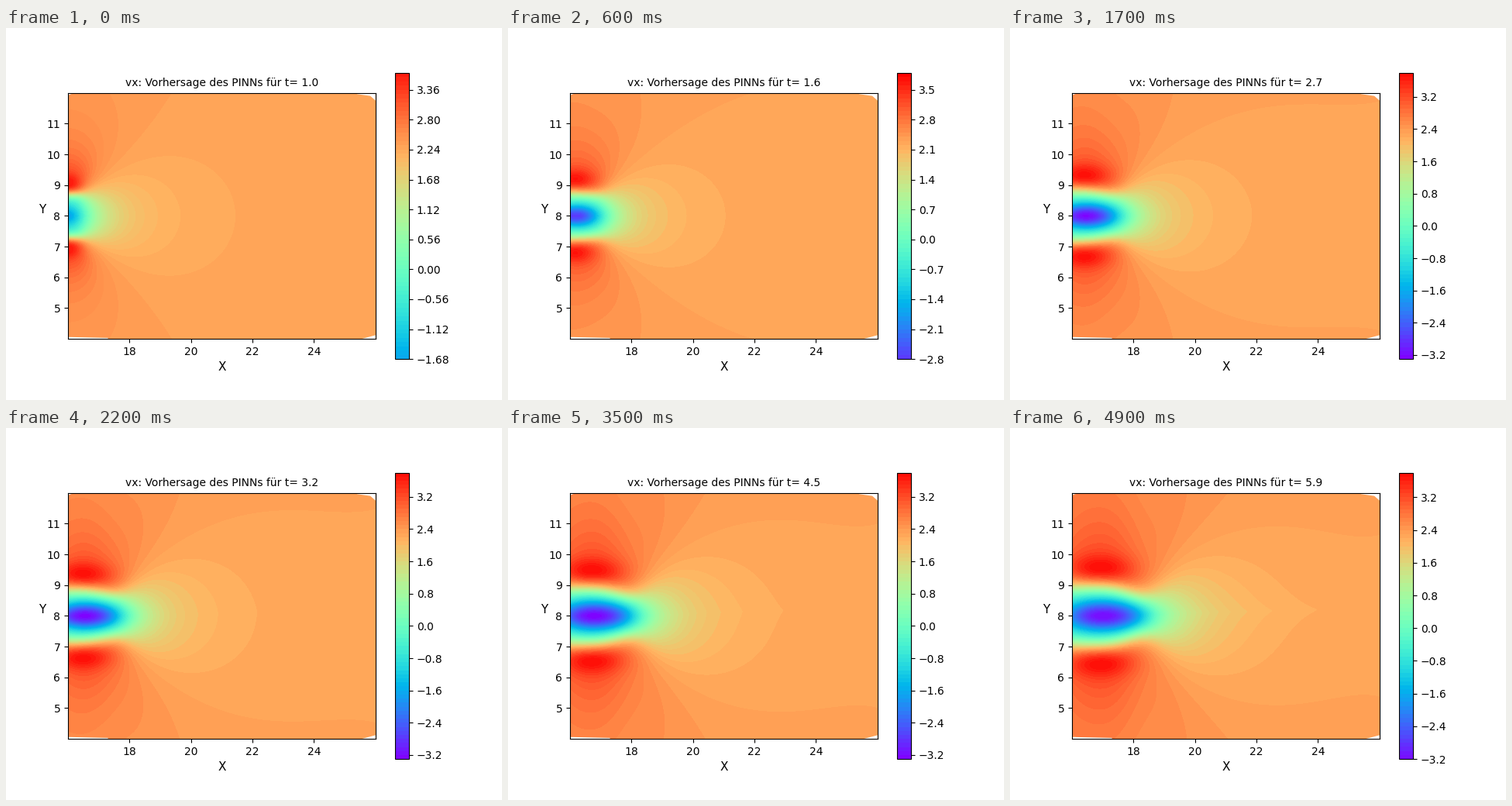
Write a matplotlib script that moves like this. It is 640 px wide and 480 px high and loops after 5 s.

```python
import numpy as np
import matplotlib.pyplot as plt
from matplotlib.animation import FuncAnimation

plt.rcParams["font.family"] = "DejaVu Sans"

FRAMES, INTERVAL = 50, 100
X, Y = np.meshgrid(np.linspace(16, 26, 221), np.linspace(4, 12, 177))
S, D = X - 16, np.abs(Y - 8)

# Corners outside the sampled region
CORNERS = [
    [(25.35, 12), (25.4, 11.96), (25.83, 11.9), (26, 11.75), (26, 12)],
    [(25.55, 4), (26, 4.12), (26, 4)],
    [(16, 4), (16, 4.06), (17.3, 4.03), (17.3, 4)],
    [(16, 12), (16.2, 12), (16, 11.92)],
]


def bell(x, width):
    return np.exp(-(x / width)**2)


def rise(age, scale):
    return 1 - np.exp(-age / scale)


def sheet(offset, start, end, soft):
    """Streamwise velocity of a softened vortex sheet."""
    a = np.sqrt(offset**2 + soft**2)
    return offset / a * (np.arctan((S - start) / a) - np.arctan((S - end) / a))


def velocity(age):
    """Free stream with a growing vortex pair, a reversed jet and side lobes."""
    growth = age**0.58
    onset = rise(age, 0.35)

    # Two sheets that converge towards their downstream end
    center, length = 0.43 * growth, 1 + 0.82 * growth
    start, end = center - length / 2, center + length / 2
    half = 0.72 + 0.08 * growth
    soft = 0.30 + 0.08 * growth
    dipole = 2.05 + 1.09 * age - 0.045 * age**2
    strength = dipole / (2 * half * length)
    gap = half * (1 - 0.14 * growth * bell(S - end + 0.15, 0.9))
    pair = strength * (sheet(D - gap, start, end, soft)
                       - sheet(D + gap, start, end, soft))

    ds = S - 0.19 * age
    reach = 0.5 + rise(age, 1.2)
    width = 0.30 + 0.06 * growth
    jet = (1 + 1.6 * onset - 0.17 * age) * bell(ds, reach) * bell(D, width)
    lobe = ((0.45 + 0.25 * onset) * bell(ds, 0.7 * reach)
            * bell(D - 1 - 0.2 * growth, width))

    tail = (0.5 * (age / 4.9)**4 * (1 - bell(S, 3))
            * np.exp(-S / 3.6 - np.abs(Y - 8 - 0.025 * S) / 0.45))
    stream = 2.308 + 0.018 * age - 0.007 * age * (S / 10)**4
    return stream + pair - jet + lobe - tail


def value_range(age):
    low = -1.65 - 1.76 * rise(age, 0.63) + 0.045 * age
    high = 3.74 + (0.9 * age - 0.1) * np.exp(-age / 0.4)
    return low, high


def contour_levels(low, high):
    step = 0.08 if high - low < 6 else 0.1
    return np.arange(np.floor(low / step), np.ceil(high / step) + 1) * step


fig = plt.figure(figsize=(6.4, 4.8), dpi=100)


def draw(i):
    fig.clear()
    ax = fig.add_subplot()
    age = 0.1 * min(i, FRAMES - 2)  # the last two steps share one field
    low, high = value_range(age)
    filled = ax.contourf(X, Y, np.clip(velocity(age), low, high),
                         contour_levels(low, high),
                         cmap="rainbow", vmin=-3.3, vmax=3.9)
    fig.colorbar(filled, ax=ax)
    for corner in CORNERS:
        ax.fill(*zip(*corner), color="white", lw=0, zorder=1.5)
    ax.set_aspect("equal")
    ax.set(xlim=(16, 26), ylim=(4, 12),
           xticks=range(18, 25, 2), yticks=range(5, 12))
    ax.set_xlabel("X", fontsize=11)
    ax.set_ylabel("Y", rotation=0, fontsize=11)
    ax.set_title(f"vx: Vorhersage des PINNs für t= {(i + 10) * 0.1}", fontsize=10)
    return []


anim = FuncAnimation(fig, draw, frames=FRAMES, interval=INTERVAL,
                     init_func=lambda: [], repeat=True, repeat_delay=0)
plt.show()
```
